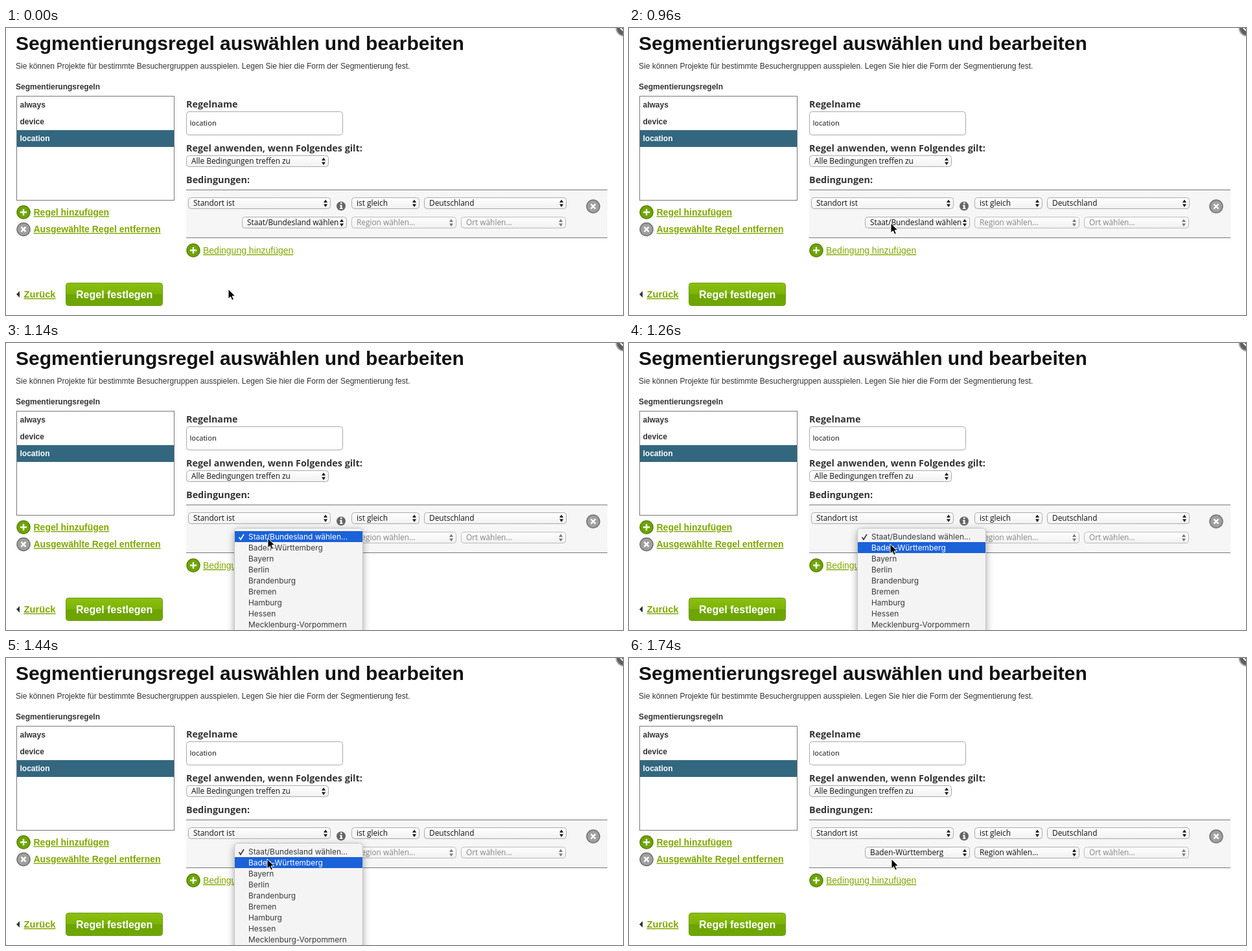
Write an HTML page that moves like this. It is 952 px wide and 444 px high and loops after 1.8 s.

```html
<!DOCTYPE html>
<html lang="de">
<head>
<meta charset="utf-8">
<title>Segmentierungsregel</title>
<style>
  html, body { margin: 0; width: 952px; height: 444px; overflow: hidden; background: #fff; }
  svg { display: block; font: 12px "Liberation Sans", Arial, sans-serif; fill: #333; }
  .bold { font-weight: bold; }
  .link { font-size: 14px; fill: #7fa800; text-decoration: underline; text-decoration-skip-ink: none; }
  .head { font: bold 14.35px "Open Sans", sans-serif; }
  .select text { font: 11.85px "Open Sans", sans-serif; fill: #111; }
  .select rect { fill: url(#field); stroke: #aaa; }
  .select path { fill: #111; }
  .off text { fill: #858585; }
  .off rect { stroke: #bbb; }
  .off path { fill: #777; }
  #menu text { font: 11.9px Inter, sans-serif; fill: #3a3a3a; }
  #menu text.on { fill: #fff; }
</style>
</head>
<body>
<svg id="stage" width="952" height="444" viewBox="0 0 952 444"></svg>
<script>
const text = (x, y, str, cls = '', attrs = '') => `<text x="${x}" y="${y}" class="${cls}" ${attrs}>${str}</text>`;

const select = (x, y, w, label, id = '', cls = '') => `
  <g id="${id}" class="select ${cls}" transform="translate(${x} ${y})">
    <rect x=".5" y=".5" width="${w - 1}" height="17" rx="4"/>
    ${text(8, 13, label)}
    <path d="M${w - 11} 8l3-4.5 3 4.5zm0 2.5h6l-3 4.5z"/>
  </g>`;

const badge = (x, y, color, ring, turn = 0) => `
  <g transform="translate(${x} ${y}) rotate(${turn})">
    <circle r="10" fill="${color}" stroke="${ring}" stroke-width="1.5"/>
    <path d="M-5 0H5M0-5V5" stroke="#fff" stroke-width="2.4"/>
  </g>`;
const plus = (x, y) => badge(x, y, '#6ea500', '#568200');
const cross = (x, y) => badge(x, y, '#a0a0a0', '#707070', 45);

const states = ['Staat/Bundesland wählen...', 'Baden-Württemberg', 'Bayern', 'Berlin', 'Brandenburg',
  'Bremen', 'Hamburg', 'Hessen', 'Mecklenburg-Vorpommern'];

stage.innerHTML = `
  <defs>
    <linearGradient id="field" x2="0" y2="1">
      <stop stop-color="#fff"/><stop offset="1" stop-color="#f1f1f1"/>
    </linearGradient>
    <linearGradient id="green" x2="0" y2="1">
      <stop stop-color="#8cc010"/><stop offset=".5" stop-color="#7cb304"/>
      <stop offset=".5" stop-color="#6ca400"/><stop offset="1" stop-color="#6fa600"/>
    </linearGradient>
    <filter id="shadow" x="-20%" y="-20%" width="140%" height="140%">
      <feDropShadow dx="0" dy="4" stdDeviation="6" flood-opacity=".35"/>
    </filter>
  </defs>
  <circle cx="954" cy="0" r="12.5" fill="#606060" stroke="#aaa" stroke-width="2"/>
  <path d="M948 0l4 4" stroke="#fff" stroke-width="2"/>

  ${text(15, 34, 'Segmentierungsregel auswählen und bearbeiten', 'bold', 'font-size="30" fill="#111"')}
  ${text(15, 63, 'Sie können Projekte für bestimmte Besuchergruppen ausspielen. Legen Sie hier die Form der Segmentierung fest.')}
  ${text(15, 95, 'Segmentierungsregeln', 'bold')}
  <rect x="16.5" y="105.5" width="243" height="161" fill="#fff" stroke="#777"/>
  <rect x="17" y="158" width="242" height="26" fill="#33677f"/>
  ${text(21.5, 123, 'always', 'bold')}
  ${text(21.5, 149, 'device', 'bold')}
  ${text(21.5, 175, 'location', 'bold', 'fill="#fff"')}
  ${plus(27, 285)}${text(42.5, 290, 'Regel hinzufügen', 'link bold')}
  ${cross(27, 311.5)}${text(42.5, 316, 'Ausgewählte Regel entfernen', 'link bold')}

  ${text(278, 123, 'Regelname', 'head')}
  <rect x="278.5" y="129.5" width="241" height="36" rx="4" fill="#fff" stroke="#aaa"/>
  ${text(283.5, 151, 'location', '', 'style="font:11.1px Open Sans,sans-serif" fill="#111"')}
  ${text(278, 191, 'Regel anwenden, wenn Folgendes gilt:', 'head')}
  ${select(278, 197, 220, 'Alle Bedingungen treffen zu')}
  ${text(278, 240, 'Bedingungen:', 'head')}

  <rect x="278" y="250" width="650" height="75" fill="#f6f6f6"/>
  <path d="M278 250.5h650M278 324.5h650" stroke="#777"/>
  ${select(281, 262, 220, 'Standort ist')}
  <circle cx="517" cy="275.5" r="7" fill="#666"/>
  <path d="M516 270h2.4v2.3H516zM515 273.8h3.4v4.6h1.2v1.6h-4.8v-1.6h1.3v-3H515z" fill="#fff"/>
  ${select(533, 262, 105, 'ist gleich')}
  ${select(645, 262, 220, 'Deutschland')}
  ${cross(906, 276)}
  ${select(364, 292, 162, '', 'state')}
  ${select(533, 292, 162, 'Region wählen...', 'region', 'off')}
  ${select(702, 292, 162, 'Ort wählen...', '', 'off')}
  ${plus(289, 344)}${text(304, 349, 'Bedingung hinzufügen', 'link')}

  <path d="M21 407v10l-5-5z"/>
  ${text(27.5, 417, 'Zurück', 'link bold', 'style="font-size:14.7px"')}
  <rect x="92.5" y="394.5" width="149" height="35" rx="4" fill="url(#green)" stroke="#6c9c10"/>
  ${text(108, 418, 'Regel festlegen', 'bold', 'font-size="16" fill="#fff"')}

  <g id="menu">
    <rect x="352.5" y="286.5" width="198" height="200" rx="5" fill="#f4f4f4" stroke="#c4c4c4" filter="url(#shadow)"/>
    <rect id="mark" x="353" y="291" width="197" height="17" fill="#1b62d9"/>
    ${states.map((name, i) => text(374, 304 + 17 * i, name)).join('')}
    <path id="check" d="M359.5 300.5l2.5 3.5 5-8" fill="none" stroke-width="1.6"/>
  </g>

  <g id="cursor" stroke="#fff" stroke-linejoin="round">
    <path id="arrow" fill="#000" d="M0 0v15l3.5-3.2 2.3 5.4 2.6-1.1-2.3-5.3h4.7z"/>
    <path id="hand" fill="#fff" stroke="#000" stroke-width="1.2" d="M0 1.2q1.6-2 2.8 0l1.4 4.6q1.5-1.3 2.5 0 1.5-.8 2.4.5 1.8-.5 2.2 1.4l.3 3.3-1.2 2.3v2.4H4.2l-1.4-2.5-5.1-5.3q.5-2 2.7-.6l1.3 1z"/>
  </g>`;

// [start ms, pointer x, pointer y, highlighted menu row: -1 = none, null = menu closed]
const steps = [
  [0, 343, 404, null], [780, 385, 349, null], [840, 397, 320, null], [900, 403, 305, null],
  [960, 404, 302, null], [1020, 404, 302, 0], [1200, 404, 306, 0], [1260, 403, 311, 1],
  [1380, 403, 311, -1], [1440, 403, 311, 1], [1500, 403, 312, null], [1680, 405, 311, null],
];
const $ = id => document.getElementById(id);
const show = (id, on) => $(id).setAttribute('visibility', on ? 'inherit' : 'hidden');
const stateLabel = $('state').querySelector('text');
const rows = [...$('menu').querySelectorAll('text')];

function draw(now) {
  const t = now % 1800;
  const [start, x, y, row] = steps.findLast(step => step[0] <= t);
  $('cursor').setAttribute('transform', `translate(${x} ${y})`);
  show('hand', start === 780);
  show('arrow', start !== 780);
  show('menu', row !== null);
  show('mark', row >= 0 && row !== null);
  $('mark').setAttribute('y', 291 + 17 * row);
  rows.forEach((item, i) => item.classList.toggle('on', i === row));
  $('check').setAttribute('stroke', row === 0 ? '#fff' : '#333');
  stateLabel.textContent = t < 1560 ? 'Staat/Bundesland wählen' : states[1];
  $('region').classList.toggle('off', t < 1680);
  requestAnimationFrame(draw);
}
draw(performance.now());
</script>
</body>
</html>
```
